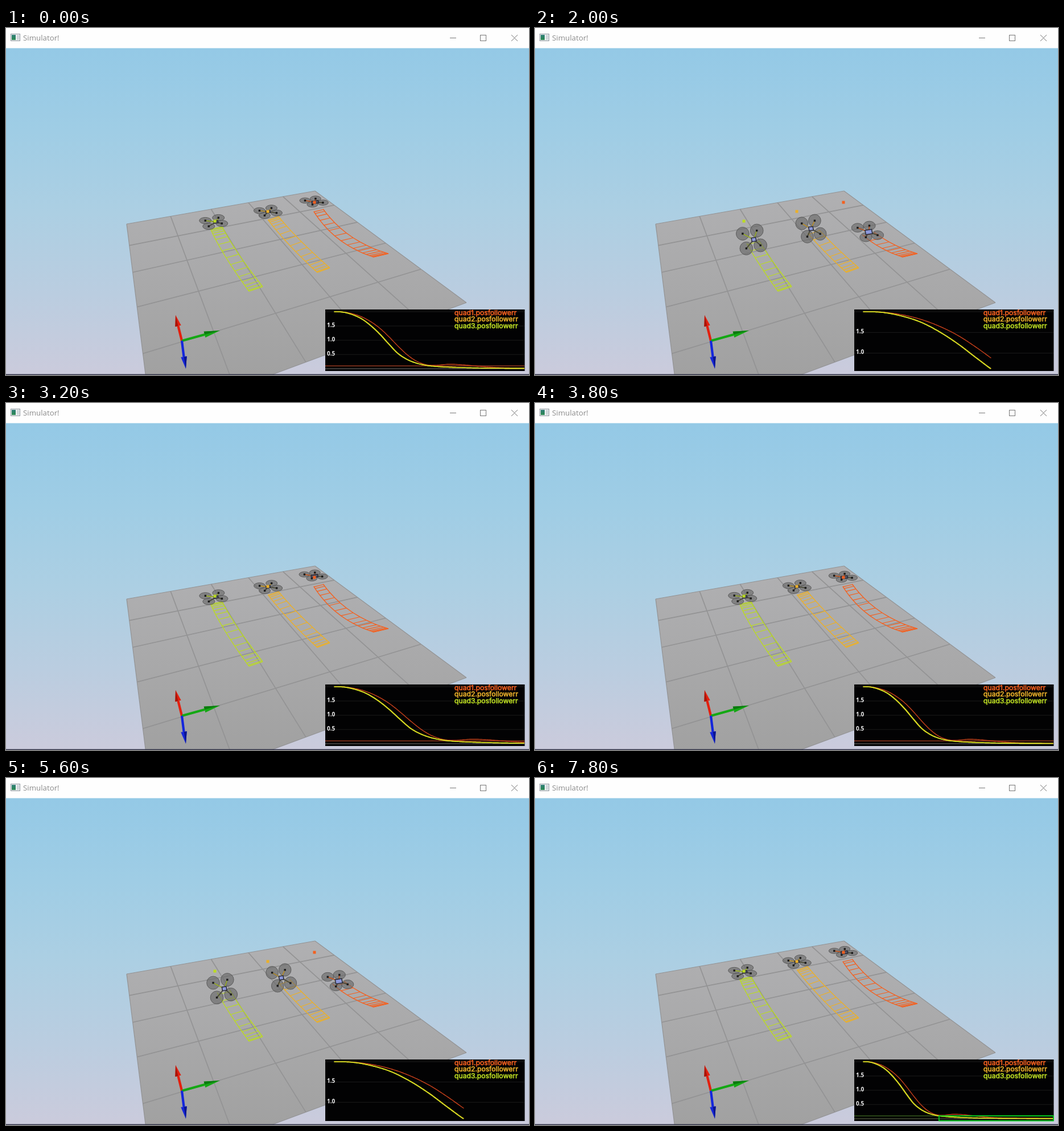
Recreate the animation shown at these times as an HTML page with a canvas. Size 919 px wide and 609 px high, loop 8000 ms.

```html
<!DOCTYPE html>
<html lang="en">
<head>
<meta charset="utf-8">
<title>Simulator!</title>
<style>
  html, body { margin: 0; width: 100%; height: 100%; overflow: hidden; }
  canvas { display: block; width: 919px; height: 609px; }
</style>
</head>
<body>
<canvas id="stage" width="919" height="609"></canvas>
<script>
const ctx = document.getElementById('stage').getContext('2d');
const LOOP = 8000, STEP = 200, FLIGHT = 3590, OFFSET = 2345, RATE = 0.89 / 1000;
const KNEE = 1.05, PASS_AT = 2.4, RUNG = 0.06;

const clamp = (v, lo, hi) => Math.min(hi, Math.max(lo, v));
const mix = (a, b, k) => a + (b - a) * k;

// Smooth curve through [x, y] points (Hermite with finite-difference slopes).
function curve(pts) {
  const last = pts.length - 1;
  const slope = i => {
    const a = pts[Math.max(0, i - 1)], b = pts[Math.min(last, i + 1)];
    return i === 0 || i === last ? 0 : (b[1] - a[1]) / (b[0] - a[0]);
  };
  return x => {
    if (x >= pts[last][0]) return pts[last][1];
    let i = 0;
    while (x > pts[i + 1][0]) i++;
    const [x0, y0] = pts[i], [x1, y1] = pts[i + 1], w = x1 - x0, s = (x - x0) / w;
    const h = s * s * (3 - 2 * s), r = 1 - s;
    return mix(y0, y1, h) + w * s * r * (r * slope(i) - s * slope(i + 1));
  };
}

const errFast = curve([[0, 2], [.1, 1.985], [.2, 1.9], [.3, 1.755], [.4, 1.52], [.5, 1.22], [.6, .87],
  [.7, .54], [.8, .33], [.9, .2], [1, .125], [1.1, .085], [1.3, .05], [1.6, .025], [2, .012], [3, .008]]);
const errSlow = curve([[0, 2], [.1, 1.99], [.2, 1.93], [.3, 1.82], [.4, 1.65], [.5, 1.42], [.6, 1.12],
  [.7, .79], [.8, .49], [.9, .27], [1, .15], [1.1, .12], [1.25, .155], [1.4, .14], [1.6, .08], [1.8, .04], [2.1, .02], [3, .01]]);
const tilt = curve([[0, 0], [.08, -.7], [.3, -.55], [.45, 0], [.6, .8], [.68, 1], [.8, .85], [.95, .45], [1.15, .1], [1.4, 0]]);

const quads = [
  { label: 'quad1.posfollowerr', color: '#f4601f', line: '#c8401a', err: errSlow, swing: true,
    path: [[659, 399], [582, 373], [542, 306]], rail: [[13, -3], [8, -2]], drop: [2, 6],
    a: [18.5, -3.3], b: [13, 7], lift: 8, rotor: [9.5, 4.7, 2.3], body: [2, 1, 13, 9] },
  { label: 'quad2.posfollowerr', color: '#ebb02a', line: '#d8b01c', err: errFast,
    path: [[558, 425], [496, 369], [460, 322]], rail: [[11, -4], [9, -3]], drop: [6, 7],
    a: [21, -4.5], b: [9, 8.5], lift: 13, rotor: [10, 5.3, 5], body: [0, 0, 9, 8] },
  { label: 'quad3.posfollowerr', color: '#bbdb22', line: '#d2de22', err: errFast,
    path: [[439, 458], [385, 386], [364.5, 340]], rail: [[12, -4], [10, -2]], drop: [3, 6],
    a: [23, -5], b: [6, 10], lift: 14, rotor: [10.5, 5.6, 5], body: [4, 0, 9, 8] }
];
const markers = [[542, 306], [460, 322], [367, 339]];

function line(pts, color, width = 1) {
  ctx.strokeStyle = color;
  ctx.lineWidth = width;
  ctx.beginPath();
  pts.forEach(p => ctx.lineTo(p[0], p[1]));
  ctx.stroke();
}
function poly(pts, color) {
  ctx.fillStyle = color;
  ctx.beginPath();
  pts.forEach(p => ctx.lineTo(p[0], p[1]));
  ctx.fill();
}
function rect(x, y, w, h, color) {
  ctx.fillStyle = color;
  ctx.fillRect(x, y, w, h);
}
function fade(y0, y1, stops) {
  const g = ctx.createLinearGradient(0, y0, 0, y1);
  stops.forEach((c, i) => g.addColorStop(i / (stops.length - 1), c));
  return g;
}

// Perspective point on the floor; u runs along the back edge, v towards the viewer.
const corners = [[212, 344, 1], [543, 286, 1.219], [809, 482, .711], [255, 687, .492]];
function floorPoint(u, v) {
  const k = [(1 - u) * (1 - v), u * (1 - v), u * v, (1 - u) * v];
  let x = 0, y = 0, w = 0;
  corners.forEach(([cx, cy, cw], i) => {
    x += cx * cw * k[i];
    y += cy * cw * k[i];
    w += cw * k[i];
  });
  return [x / w, y / w];
}

function drawWindow() {
  rect(0, 0, 919, 35.4, '#fefefe');
  rect(8, 10, 17, 13, '#8c959c');
  rect(9, 11, 15, 11, '#eef1f3');
  rect(10, 12, 7, 9, fade(12, 21, ['#2f7d78', '#2c8a50']));
  rect(19, 12, 4, 9, '#cfd6da');
  ctx.fillStyle = '#8b8b8b';
  ctx.font = '13.3px "Open Sans", "Noto Sans", sans-serif';
  ctx.fillText('Simulator!', 30, 22);
  line([[780, 17.5], [791, 17.5]], '#777');
  ctx.strokeRect(833.5, 12.5, 10, 10);
  line([[888, 12], [899, 23]], '#777');
  line([[899, 12], [888, 23]], '#777');
}

function drawWorld() {
  rect(0, 35, 919, 574, fade(36, 609, ['#94c9e6', '#9fcde5', '#accfe3', '#bacde0', '#cbcbdc']));
  poly([[0, 0], [1, 0], [1, 1], [0, 1]].map(p => floorPoint(...p)), fade(286, 609, ['#b0b0b2', '#a9a9aa', '#a1a1a1']));
  for (let i = 0; i <= 5; i++) {
    const width = i % 5 ? 1.7 : 1.2;
    line([floorPoint(i / 5, 0), floorPoint(i / 5, 1)], '#939394', width);
    line([floorPoint(0, i / 5), floorPoint(1, i / 5)], '#939394', width);
  }
  rect(0, 607.5, 919, 1.5, '#34364a');
}

function drawArrow(tip, neck, color, dark) {
  const root = [309, 549], dx = tip[0] - neck[0], dy = tip[1] - neck[1], n = Math.hypot(dx, dy);
  const sx = -dy / n * 5.3, sy = dx / n * 5.3;
  line([root, neck], color, 4.2);
  poly([[neck[0] + sx, neck[1] + sy], tip, [neck[0] - sx, neck[1] - sy]], color);
  poly([neck, tip, [neck[0] - sx, neck[1] - sy]], dark);
}

const progress = (q, u) => {
  const sign = q.swing ? clamp((KNEE - u) / .15, -1, 1) : 1;
  return 1 - q.err(u) * sign / 2;
};
function place(q, p) {
  const r = 1 - p;
  return [0, 1].map(i => r * r * q.path[0][i] + 2 * r * p * q.path[1][i] + p * p * q.path[2][i]);
}

function drawTrail(q, now) {
  const rung = u => {
    const p = 1 - q.err(u) / 2, [x, y] = place(q, p);
    const dx = mix(q.rail[0][0], q.rail[1][0], p), dy = mix(q.rail[0][1], q.rail[1][1], p);
    const cx = x + q.drop[0] * p, cy = y + q.drop[1] * p;
    return [[cx - dx, cy - dy], [cx + dx, cy + dy]];
  };
  const end = Math.min(now, KNEE), rungs = [];
  for (let u = 0; u < end; u += RUNG) rungs.push(rung(u));
  rungs.forEach(r => line(r, q.color, 1.2));
  rungs.push(rung(end));
  line(rungs.map(r => r[0]), q.color, 1.4);
  line(rungs.map(r => r[1]), q.color, 1.4);
}

function drawQuad(q, u) {
  const p = progress(q, u), k = tilt(u), s = 1 + .26 * (1 - p), [x, y] = place(q, p);
  const by = q.b[1] + q.lift * k;
  const [rx, ry, open] = q.rotor;
  const hubs = [[-1, -1], [1, -1], [-1, 1], [1, 1]].map(([i, j]) =>
    [x + s * (i * q.a[0] + j * q.b[0]) / 2, y + s * (i * q.a[1] + j * by) / 2]);
  const [ox, oy, w, h] = q.body, bx = x + ox, byy = y + oy;
  hubs.forEach(hub => {
    ctx.beginPath();
    ctx.ellipse(hub[0], hub[1], rx * s, Math.max(1.2, ry + open * k) * s, 0, 0, 7);
    ctx.fillStyle = 'rgba(100,100,100,.6)';
    ctx.fill();
    ctx.strokeStyle = '#5c5c5c';
    ctx.lineWidth = 1;
    ctx.stroke();
  });
  hubs.forEach((hub, i) => {
    line([hub, [bx, byy]], '#4a4a38', 1.8);
    if (i < 2) line([hub, [bx, byy]], q.color, 1.1);
    rect(hub[0] - 1.7, hub[1] - 1.7, 3.4, 3.4, '#1c1c1c');
  });
  const bh = h * (.65 + .35 * Math.abs(k));
  ctx.save();
  ctx.translate(bx, byy);
  ctx.transform(1, -.15, .2, 1, 0, 0);
  rect(-w / 2, -bh / 2, w, bh, '#2b2c38');
  rect(-w / 2 + 1.5, -bh / 2 + 1.5, w - 3, bh - 3, k > .3 ? '#8c98dc' : '#56586a');
  ctx.restore();
}

function drawPlot(u) {
  const left = 577, width = 334, top = 498, span = Math.max(1, u);
  const range = Math.max(.01, 2 - (u > 1.1 ? 0 : errFast(u)));
  const X = v => left + v / span * width, Y = e => top + (2 - e) * 100 / range;
  const passed = u > PASS_AT;

  rect(561, 494, 350.5, 108, '#020203');
  ctx.save();
  ctx.beginPath();
  ctx.rect(561, 494, 351, 109);
  ctx.clip();

  const step = [.01, .02, .05, .1, .2, .5].find(s => range / s <= 4.5) || .5;
  ctx.font = 'bold 10px "Open Sans", "Noto Sans", sans-serif';
  line([[561, top], [911, top]], '#1b1b1b');
  for (let i = 1; i * step < range * .95; i++) {
    const v = 2 - i * step;
    line([[561, Y(v)], [911, Y(v)]], '#1b1b1b');
    ctx.fillStyle = '#eee';
    ctx.fillText(v.toFixed(step < .1 ? 2 : 1), 564, Y(v) + 1.5);
  }
  line([[561, Y(0)], [911, Y(0)]], passed ? '#66704e' : '#777', 1.2);
  line([[561, Y(.1)], [911, Y(.1)]], passed ? '#36581c' : '#92371f', 1.3);

  quads.forEach((q, i) => {
    const pts = [];
    for (let n = 0; n <= 160; n++) {
      const v = u * n / 160;
      pts.push([X(v) + (i === 2 ? -.8 : 0), Y(q.err(v))]);
    }
    line(pts, q.line, i ? 1.7 : 1.4);
  });

  ctx.font = '12.2px Inter, "Open Sans", sans-serif';
  ctx.lineJoin = 'round';
  quads.forEach((q, i) => {
    ctx.fillStyle = ctx.strokeStyle = q.color;
    ctx.lineWidth = .6;
    ctx.fillText(q.label, 788, 504 + i * 11.3);
    ctx.strokeText(q.label, 788, 504 + i * 11.3);
  });
  if (passed) {
    ctx.strokeStyle = '#05c81e';
    ctx.lineWidth = 1.8;
    ctx.strokeRect(X(KNEE), 593, 911 - X(KNEE), 8.5);
  }
  ctx.restore();
}

function draw(now) {
  const t = Math.floor(now % LOOP / STEP) * STEP;
  const u = (t + OFFSET) % FLIGHT * RATE;
  drawWorld();
  drawArrow([298, 504], [302.5, 523], '#e3200f', '#a81408');
  drawArrow([376, 531], [349, 538], '#14a814', '#0b7a0e');
  drawArrow([316, 598], [312.5, 577], '#1426dc', '#0a1590');
  quads.forEach((q, i) => {
    const [x, y] = markers[i];
    drawTrail(q, u);
    drawQuad(q, u);
    rect(x - 2.5, y - 2.5, 5, 5, q.color);
  });
  drawPlot(u);
  drawWindow();
}

const start = performance.now();
function tick() {
  draw(performance.now() - start);
  requestAnimationFrame(tick);
}
tick();
</script>
</body>
</html>
```
